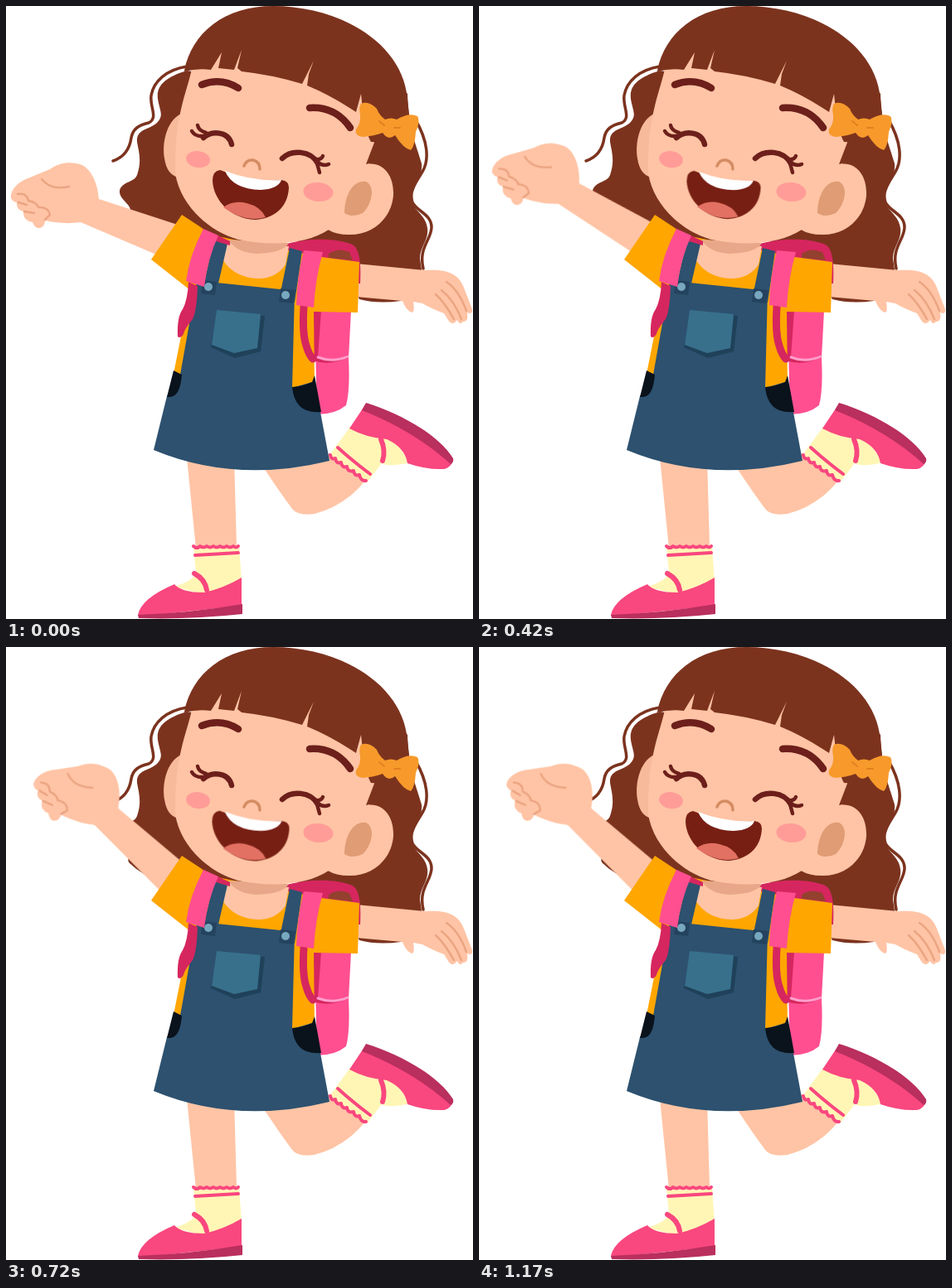
Write an HTML page that moves like this. It is 563x740 px and loops after 1800 ms.

```html
<!DOCTYPE html>
<html lang="en">
<head>
<meta charset="utf-8">
<title>Happy schoolgirl waving</title>
<style>
  html, body { margin: 0; width: 100%; height: 100%; overflow: hidden; background: #fff; }
  svg { display: block; width: 100%; height: 100%; }
  .skin { fill: #ffc4a5; }
  .hair { fill: #7c331e; }
  .shirt { fill: #ffa600; }
  .denim { fill: #2d516f; }
  .dark { fill: #d6265f; }
  .pink { fill: #ff4f90; }
  .shoe { fill: #f9477f; }
  .sole { fill: #b92f5e; }
  .sock { fill: #fff6b6; }
  .line { fill: none; stroke-linecap: round; stroke-linejoin: round; }
  .strand { stroke: #7c331e; stroke-width: 3.5; }
  .crease { stroke: #eba583; stroke-width: 2.5; }
  .brow { stroke: #6d1f1b; stroke-width: 8.5; }
  .eye { stroke: #6d1f1b; stroke-width: 6.5; }
  .lash { stroke: #6d1f1b; stroke-width: 4.5; }
  .trim { stroke: #f9477f; stroke-width: 4; }
  .strap { stroke: #d6265f; stroke-width: 9; }
  #arm { transform-origin: 222px 274px; --turn: 22deg; }
  #hand { transform-origin: 100px 235px; --turn: -8deg; }
  #mouth { transform-origin: 295px 227px; animation: laugh 1.8s infinite; }
  #arm, #hand { animation: raise 1.8s infinite; }
  #arm, #hand, #mouth { animation-timing-function: cubic-bezier(.37, 0, .63, 1); }
  @keyframes raise {
    0%, 14.4% { transform: rotate(0deg); }
    33.3%, 100% { transform: rotate(var(--turn)); }
  }
  @keyframes laugh {
    0%, 1.7% { transform: scale(1); }
    14.4% { transform: scale(1.15); }
    30.3%, 32.5% { transform: scale(.85); }
    46.9% { transform: scale(1.15); }
    65%, 100% { transform: scale(1); }
  }
</style>
</head>
<body>
<svg viewBox="0 0 563 740" preserveAspectRatio="none">
  <g id="back-hair">
    <path class="line strand" d="M218 73C193 77 178 91 175 108C173 122 184 135 172 141C160 144 153 148 151 159C149 173 141 183 129 187"/>
    <path class="line strand" d="M494 138C508 162 511 185 502 200C496 211 485 222 490 237C495 248 513 251 513 267C513 282 497 291 503 317"/>
    <path class="hair" d="M218 78C192 86 181 96 183 112C185 126 191 132 182 141C172 150 157 148 158 164C160 176 164 187 158 204C155 213 139 212 137 223C136 234 152 239 150 249C149 255 145 256 149 261Q164 276 190 284L300 290V90Z"/>
    <path class="hair" d="M484 105C485 150 495 168 501 190C503 207 489 220 489 234C491 247 506 252 508 268C510 283 499 290 499 305L502 325L476 356Q448 360 426 354L390 288L350 284L430 150Z"/>
  </g>

  <g id="arm">
    <path class="skin" d="M216 267L112 233L95 225L82 261L90 261L202 309Z"/>
    <g id="hand">
      <path class="skin" d="M112 235C111 215 104 199 92 192C78 187 64 189 53 197L29 207C14 212 5 222 6 232Q9 237 13 237Q12 246 21 248Q20 259 32 261Q35 269 41 268Q47 266 47 259Q68 264 90 261L104 252Z"/>
      <path class="line crease" d="M43 209Q54 223 76 218M14 227Q25 225 27 235Q37 237 39 243Q51 242 53 252L47 258M15 237L25 240M22 248L34 250"/>
    </g>
  </g>

  <g id="right-arm">
    <path class="skin" d="M422 311L505 319C533 317 546 324 552 340L562 366Q563 373 556 370Q558 382 551 381Q547 386 544 379Q538 387 533 379L528 371Q512 365 502 359L491 357Q493 370 489 370Q482 367 478 356L422 351Z"/>
    <path class="line crease" d="M531 333Q546 343 555 368M525 343Q540 355 549 378M518 348Q529 358 540 378"/>
  </g>

  <g id="back-leg">
    <path class="skin" d="M309 555Q328 584 345 607Q352 616 372 613Q408 604 433 573L390 540Z"/>
    <path class="sock" d="M390 542L415 508L465 520L487 551Q462 557 453 552L436 574Z"/>
    <path class="line trim" d="M391 542q1 6 6 4q1 7 7 5q1 7 7 5q1 7 8 5q1 7 7 5q2 8 8 7M400 533Q420 551 439 565"/>
    <path class="shoe" d="M434 480L414 510Q434 521 459 523Q481 533 484 552Q507 560 528 559Q537 557 539 548Z"/>
    <path class="sole" d="M434 479C476 492 522 518 539 546Q540 551 536 553C507 526 466 502 429 488Z"/>
    <path class="line trim" style="stroke-width:6" d="M452 523Q458 537 454 549"/>
  </g>

  <g id="front-leg">
    <path class="skin" d="M218 545H275L278 652L229 655Z"/>
    <path class="sock" d="M226 653L281 652L284 695L245 712L203 701Q226 694 229 684Z"/>
    <path class="line trim" d="M226 652q4 4 8 0q4 3 8 0q4 3 8 0q4 3 8 0q4 3 8 0q4 3 8 0q4 3 6 0M228 663L280 660"/>
    <path class="shoe" d="M159 735Q163 715 203 698Q211 708 239 708Q262 703 284 690V724L160 737Z"/>
    <path class="sole" d="M159 735Q220 733 285 722V734Q220 741 160 739Z"/>
    <path class="line trim" style="stroke-width:6" d="M227 685Q240 692 242 705"/>
  </g>

  <g id="backpack">
    <path class="dark" d="M334 288C370 278 405 281 419 289Q429 296 427 335H375Z"/>
    <path fill="#94402f" d="M389 299Q400 291 414 297L418 307L389 304Z"/>
    <path class="pink" d="M372 368H416L413 425Q415 464 410 482Q397 493 375 493Z"/>
    <path class="dark" d="M369 368H380L376 424Q393 432 412 421L411 424Q392 435 370 428Z"/>
    <path class="line" stroke="#ff9fcc" stroke-width="3" d="M376 424Q394 431 412 423"/>
  </g>

  <g id="shirt">
    <path class="shirt" d="M212 252L250 277L380 303L426 309L424 370L371 369L372 456L340 464L202 444L222 343L175 306Z"/>
    <path class="skin" d="M262 285L341 290L337 312Q326 329 304 329Q275 328 261 306Z"/>
    <path fill="#e8a788" d="M268 282L341 286Q335 298 302 299Q278 298 268 282Z"/>
  </g>

  <g id="dress">
    <path class="denim" d="M230 333L254 334L331 342L348 344L345 461L372 453L390 549Q277 577 178 536L194 471L210 445Z"/>
    <path fill="#0a121c" d="M202 440L212 445Q210 471 198 472L194 472ZM345 460Q358 459 369 454L372 446L380 490Q348 493 345 460Z"/>
    <path class="denim" d="M251 281L267 287L253 348L236 346ZM342 292L357 296L348 358L329 355Z"/>
    <path fill="#24435f" d="M237 331L254 333L252 349L235 347ZM331 341L349 343L346 359L329 357Z"/>
    <circle cx="244" cy="339" r="5" fill="#78a8bf"/>
    <circle cx="337" cy="349" r="5" fill="#78a8bf"/>
    <path fill="#1f4159" d="M255 369L312 374L307 417L276 425L247 412Z"/>
    <path fill="#38708c" d="M254 367L307 372L303 413L275 419L248 409Z"/>
  </g>

  <g id="straps">
    <path class="dark" d="M220 333L231 338Q230 368 225 378Q215 390 214 396Q210 402 207 399Q206 375 213 366Q219 355 220 333Z"/>
    <path class="line strap" d="M359 363Q357 396 362 410Q365 421 370 426"/>
    <path class="dark" d="M236 268L270 284V289L250 283Z"/>
    <path class="pink" d="M238 269L256 277Q243 305 239 339L217 332Q221 301 238 269ZM359 295L382 297Q373 328 371 364L350 361Q351 325 359 295Z"/>
  </g>

  <g id="head">
    <path fill="#f7ba9a" d="M211 130C193 139 188 166 191 184Q194 204 208 207Z"/>
    <path class="skin" d="M434 191C455 187 468 205 467 228C465 257 441 277 413 276Q398 276 388 270Z"/>
    <path class="skin" d="M226 65C220 105 204 120 204 202C210 239 242 271 280 282C325 291 365 286 389 270C419 247 437 211 445 160L430 80L300 40Z"/>
    <path fill="#e09c74" d="M434 212C446 218 441 240 430 250Q416 256 408 250C408 232 416 210 434 212Z"/>
    <path class="hair" d="M215 78C224 32 264 0 322 0C400 0 478 43 484 112L490 168L440 164Q433 152 430 125L428 106L422 128Q392 108 363 96L365 82L371 66L357 94Q321 83 284 79L279 75L284 53L275 77L256 75L260 56L247 77Q231 75 215 79Z"/>
    <path class="hair" d="M447 157L434 191Q449 187 458 196L485 205L488 160Z"/>
    <path fill="#f79a2b" d="M428 118Q437 114 447 124Q450 132 457 137Q464 134 471 137Q486 128 496 133Q500 139 494 152Q493 169 488 174Q479 172 469 156Q461 163 454 153Q444 157 430 158Q420 157 422 149Q428 141 427 132Q425 122 428 118Z"/>
    <path class="line" stroke="#e47f20" stroke-width="2" d="M450 139L456 144M468 147L475 147"/>
    <path class="line brow" d="M236 95Q259 86 280 99M366 123Q397 121 415 147"/>
    <path class="line eye" d="M238 159C248 150 268 151 272 167M333 184C344 173 367 174 376 190"/>
    <path class="line lash" d="M238 157Q228 158 224 151M241 153Q232 150 231 144M375 188Q382 194 389 191M373 185Q380 186 382 181M375 190L378 201"/>
    <path class="line" stroke="#d58c62" stroke-width="3.5" d="M287 193Q290 185 298 186Q306 188 306 197"/>
    <ellipse cx="231.500" cy="185" rx="14.500" ry="10" fill="#ff9c98" transform="rotate(8 231 185)"/>
    <ellipse cx="376.500" cy="224.500" rx="18" ry="11.500" fill="#ff9c98" transform="rotate(5 376 224)"/>
  </g>

  <g id="mouth">
    <path fill="#781f14" d="M258 198Q296 214 332 210Q341 211 341 219C340 244 322 257 300 258C272 257 250 235 249 211Q249 199 258 198Z"/>
    <path fill="#fff" d="M264 199Q297 212 332 210Q328 221 307 222Q273 221 264 199Z"/>
    <path fill="#e27163" d="M262 243Q274 234 290 238Q307 242 313 255Q287 262 262 243Z"/>
  </g>
</svg>
</body>
</html>
```
